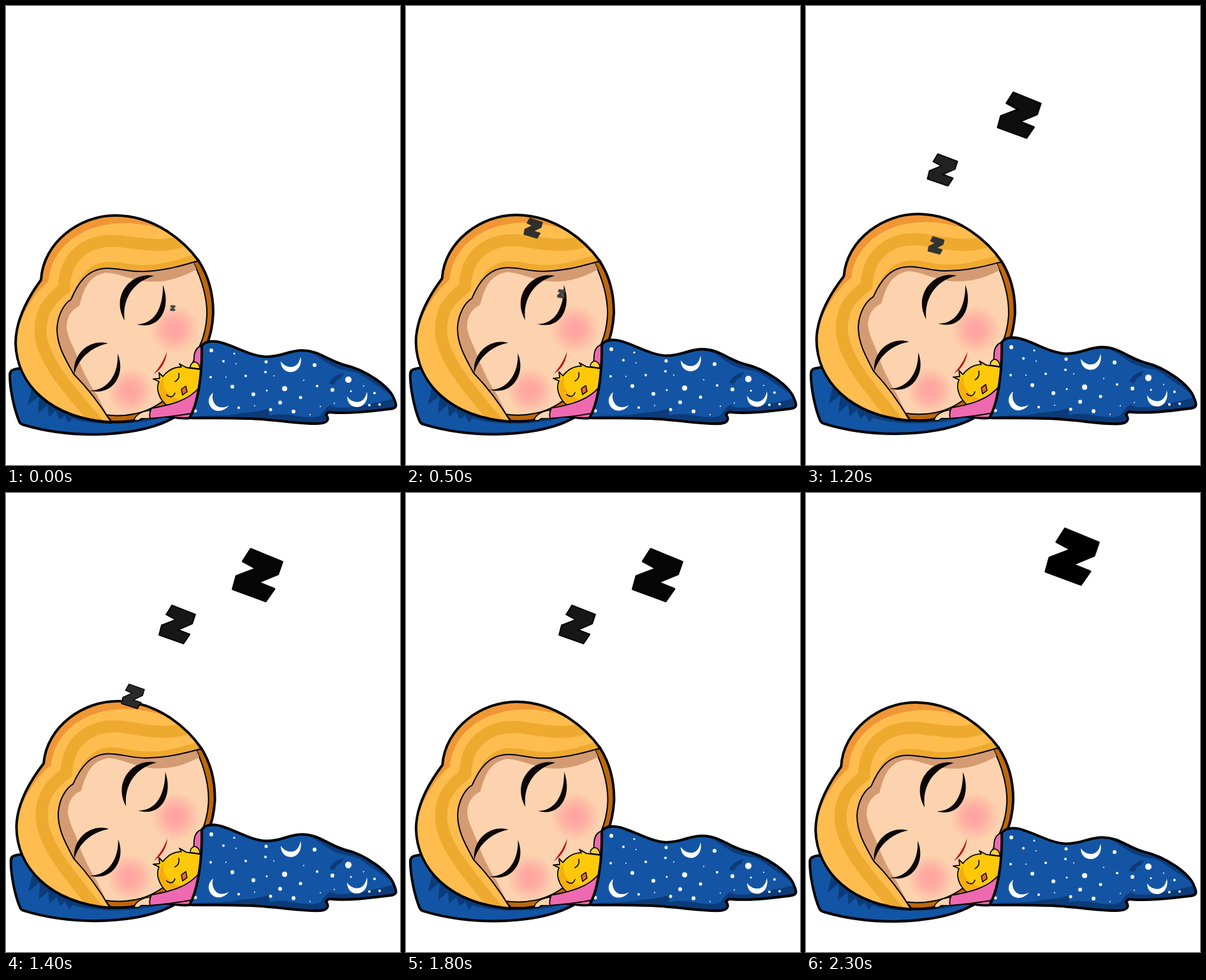
An HTML page for the animation above (2.4 s loop, 618x721 px).

```html
<!DOCTYPE html>
<html lang="en">
<head>
<meta charset="utf-8">
<title>Sleeping</title>
<style>
html, body { margin: 0; width: 100%; height: 100%; overflow: hidden; background: #fff; }
svg { display: block; width: 618px; height: 721px; }
.ink { stroke: #000; stroke-linejoin: round; stroke-linecap: round; }
.line { fill: none; }
</style>
</head>
<body>
<svg viewBox="0 0 618 721">
  <defs>
    <radialGradient id="blush">
      <stop offset="0" stop-color="#ffa3a0"/>
      <stop offset=".35" stop-color="#ffa3a0" stop-opacity=".85"/>
      <stop offset="1" stop-color="#ffa3a0" stop-opacity="0"/>
    </radialGradient>
    <path id="hairShape" d="M302 400C280 370 234 329 171 329C115 329 58 372 55 430C36 456 15 492 15 530C17 595 70 648 165 654C143 618 120 592 106 578C92 553 80 533 80 507C81 484 92 467 102 461C112 437 127 412 159 412C181 412 192 418 216 417C248 416 276 408 302 400Z"/>
    <path id="faceShape" d="M293 401C309 432 316 463 315 487C314 506 310 521 303 536C285 585 255 628 205 640C187 644 168 644 155 642L70 560V420L160 390Z"/>
    <path id="quiltShape" d="M307 534C313 525 328 525 342 530C364 537 385 550 408 551C434 551 442 541 465 541C491 541 505 557 531 564C563 571 602 597 609 618C614 629 612 632 602 633C570 637 535 641 506 638L502 642C508 650 504 656 488 656C459 656 438 652 410 650C370 646 330 648 288 647C301 624 308 580 307 534Z"/>
    <path id="moon" d="M-16-5C-16 5-10 12 0 12C11 12 18 0 15-12C13-1 7 4 0 4C-7 4-13 0-16-5Z" fill="#fff"/>
    <clipPath id="hairClip"><use href="#hairShape"/></clipPath>
    <clipPath id="faceClip"><use href="#faceShape"/></clipPath>
    <clipPath id="quiltClip"><use href="#quiltShape"/></clipPath>
  </defs>

  <g id="pillow">
    <path class="ink" fill="#1255a4" stroke-width="4" d="M40 568C27 569 18 569 13 571Q6 572 6 580C6 600 12 632 21 653Q23 657 28 658C68 670 108 673 138 673C190 672 236 663 266 645L180 600Z"/>
    <path fill="#0b3b79" d="M26 574L43 588L34 627L52 613L50 640L65 627L67 646L78 636L84 650L92 643L98 655L104 648C140 660 205 659 250 645L150 600Z"/>
  </g>

  <g id="head">
    <path class="ink" fill="#bd680b" stroke-width="4" d="M302 400C317 423 325 452 325 482C324 505 320 520 312 540C295 590 260 634 214 648C196 653 180 654 165 653L120 600L160 420Z"/>
    <use class="ink" href="#faceShape" fill="#fcd3ae" stroke-width="2"/>
    <g clip-path="url(#faceClip)">
      <path fill="#d49b73" d="M310 395L298 414C276 426 256 433 230 433C200 433 178 419 156 419C131 424 123 442 117 464L115 471C101 478 95 490 95 505C97 523 107 536 112 552C119 571 132 596 142 610L165 654L60 590V420L160 390Z"/>
      <circle cx="264" cy="508" r="39" fill="url(#blush)"/>
      <circle cx="195" cy="605" r="37" fill="url(#blush)"/>
    </g>
    <path fill="#0b0506" d="M232 424C198 416 163 454 186 494C182 461 199 433 232 424ZM246 438C260 474 241 510 205 500C233 500 247 474 246 438ZM160 530C132 522 103 546 107 579C113 555 132 536 160 530ZM175 546C189 578 167 614 131 604C157 605 177 581 175 546Z"/>
    <path fill="#c00d10" d="M252 543C252 556 244 571 232 578C241 567 248 556 252 543Z"/>
    <use href="#hairShape" fill="#ffbd4f"/>
    <g clip-path="url(#hairClip)">
      <path fill="#f09635" d="M12 530C22 491 39 455 67 432C69 390 107 342 185 341C213 341 235 347 262 356L171 320L60 340L0 450Z"/>
      <path class="line" stroke="#eeaa2e" stroke-width="19" d="M282 367C248 381 220 374 190 371C137 361 92 385 91 444C62 467 54 483 54 513C57 555 92 595 148 660"/>
      <path fill="#eeaa2e" d="M306 386C269 400 239 408 211 407C187 406 178 401 158 402C127 405 116 428 104 454L110 470L160 425H230L310 405Z"/>
    </g>
    <use class="ink line" href="#hairShape" stroke-width="2"/>
    <path class="ink line" stroke-width="4" d="M302 400C280 370 234 329 171 329C115 329 58 372 55 430C36 456 15 492 15 530C17 595 70 648 165 654"/>
  </g>

  <g id="body">
    <path class="ink" fill="#ef69b0" stroke-width="1.8" d="M309 533Q296 536 295 551L294 566L309 574ZM258 645Q272 650 290 648L288 636Z"/>
    <path class="ink line" stroke-width="3" d="M250 645Q268 648 290 647"/>
    <path class="ink" fill="#ffc90a" stroke-width="1.8" d="M252 627C239 616 235 600 240 590L231 586L241 585L240 576L246 582C254 572 264 567 275 567L272 562L283 568L306 571V605C291 617 274 624 252 627Z"/>
    <path fill="#f7ae0b" d="M251 625C239 613 238 600 242 591L248 582C244 599 253 614 275 619Z"/>
    <path class="ink" fill="#ffd33d" stroke-width="1.5" d="M289 568Q289 561 296 559Q304 561 304 570Z"/>
    <path class="ink line" stroke-width="1.6" d="M271 577Q273 586 265 590M252 611Q261 618 265 608"/>
    <path class="ink" fill="#e66a1c" stroke-width="1.5" d="M275 602L282 597L284 606L277 611Z"/>
    <path class="ink" fill="#fcd3ae" stroke-width="1.6" d="M229 635C215 636 203 641 201 651L208 651L212 648L227 648Z"/>
    <path class="ink" fill="#ef69b0" stroke-width="1.8" d="M228 632C257 627 287 620 304 598L296 639C275 643 250 646 226 648Q224 640 228 632Z"/>
    <use href="#quiltShape" fill="#1355a4"/>
    <g clip-path="url(#quiltClip)">
      <path fill="#0c3b79" d="M285 648C310 640 335 646 360 641C377 637 393 640 418 630Q409 637 414 643C439 636 465 650 489 645C500 640 497 632 510 627C517 637 565 627 612 616V665H285ZM465 540C488 547 498 559 515 567C531 574 545 572 558 580L610 615L570 555L490 530ZM507 593Q510 582 530 576L526 584Q517 587 515 595Z"/>
      <g id="stars"></g>
      <use href="#moon" x="447" y="563"/>
      <use href="#moon" x="551" y="618"/>
      <use href="#moon" transform="translate(331 623) rotate(52)"/>
    </g>
    <use class="ink line" href="#quiltShape" stroke-width="4"/>
  </g>

  <g id="snores"></g>
</svg>
<script>
const NS = 'http://www.w3.org/2000/svg';
const LOOP = 2400, STEP = 100, GAP = 4;
const byId = id => document.getElementById(id);

function add(parent, name, attrs) {
  const el = document.createElementNS(NS, name);
  for (const key in attrs) el.setAttribute(key, attrs[key]);
  return parent.appendChild(el);
}

// x, y, radius
const stars = [
  [322,541,3], [341,558,2], [358,546,1.5], [408,559,2.5], [407,575,2], [376,581,2],
  [361,562,1], [321,583,2], [345,583,1], [355,598,3], [388,610,3], [437,601,4],
  [409,604,1.5], [430,623,3], [365,631,2], [415,634,2.5], [451,637,3], [462,615,2.5],
  [390,628,1], [420,581,1], [484,564,3], [467,588,1], [488,597,2], [512,603,3],
  [537,587,5], [493,629,1], [477,642,1], [515,624,1], [541,605,1.5], [561,597,1],
  [578,608,2], [570,627,2], [586,626,2], [297,636,2.5]
];
for (const [cx, cy, r] of stars) add(byId('stars'), 'circle', { cx, cy, r, fill: '#fff' });

// Rising path of one letter: x, y, height
const rise = [
  [261.5,474.5,11], [243.5,452,16], [229,428,21], [214,402,25], [204,376,30],
  [199.5,349,34], [199,319.5,41], [203,287,47], [214,257.5,53], [237.5,228,58],
  [268.5,206.5,63], [300,189,69], [334.5,171.5,75], [366,151,80], [394.5,129,86], [417.5,100,92]
];
const zShape = 'M-9-36L34-18L28-1L1 10L23 19L11 36L-34 19L-29 1L-2-9L-20-19Z';
const snores = [0, 1, 2].map(() => add(byId('snores'), 'path', {
  d: zShape, 'stroke-width': 2.6, 'stroke-linejoin': 'round'
}));

function drawSnore(el, i) {
  const pose = rise[i];
  el.style.display = pose ? '' : 'none';
  if (!pose) return;
  const [x, y, h] = pose;
  const shade = Math.round(70 * (1 - i / 15));
  const fill = `rgb(${shade},${shade},${shade})`;
  el.setAttribute('fill', fill);
  el.setAttribute('stroke', i < 6 ? fill : '#000');
  el.setAttribute('transform',
    `translate(${x} ${y}) rotate(${-18 * 0.75 ** i}) scale(${h / 75})`);
}

function draw(step) {
  const breath = (1 - Math.cos(2 * Math.PI * step * STEP / LOOP)) / 2;
  byId('head').setAttribute('transform', `rotate(${1.65 * breath} 249 578)`);
  byId('body').setAttribute('transform',
    `translate(0 650) scale(1 ${1 + 0.047 * breath}) translate(0 -650)`);
  byId('pillow').setAttribute('transform',
    `translate(${1.2 * breath} 0) rotate(${0.45 * breath} 250 650)`);
  snores.forEach((el, n) => drawSnore(el, step - n * GAP));
}

const start = performance.now();
function tick() {
  draw(Math.floor((performance.now() - start) % LOOP / STEP));
  requestAnimationFrame(tick);
}
tick();
</script>
</body>
</html>
```
